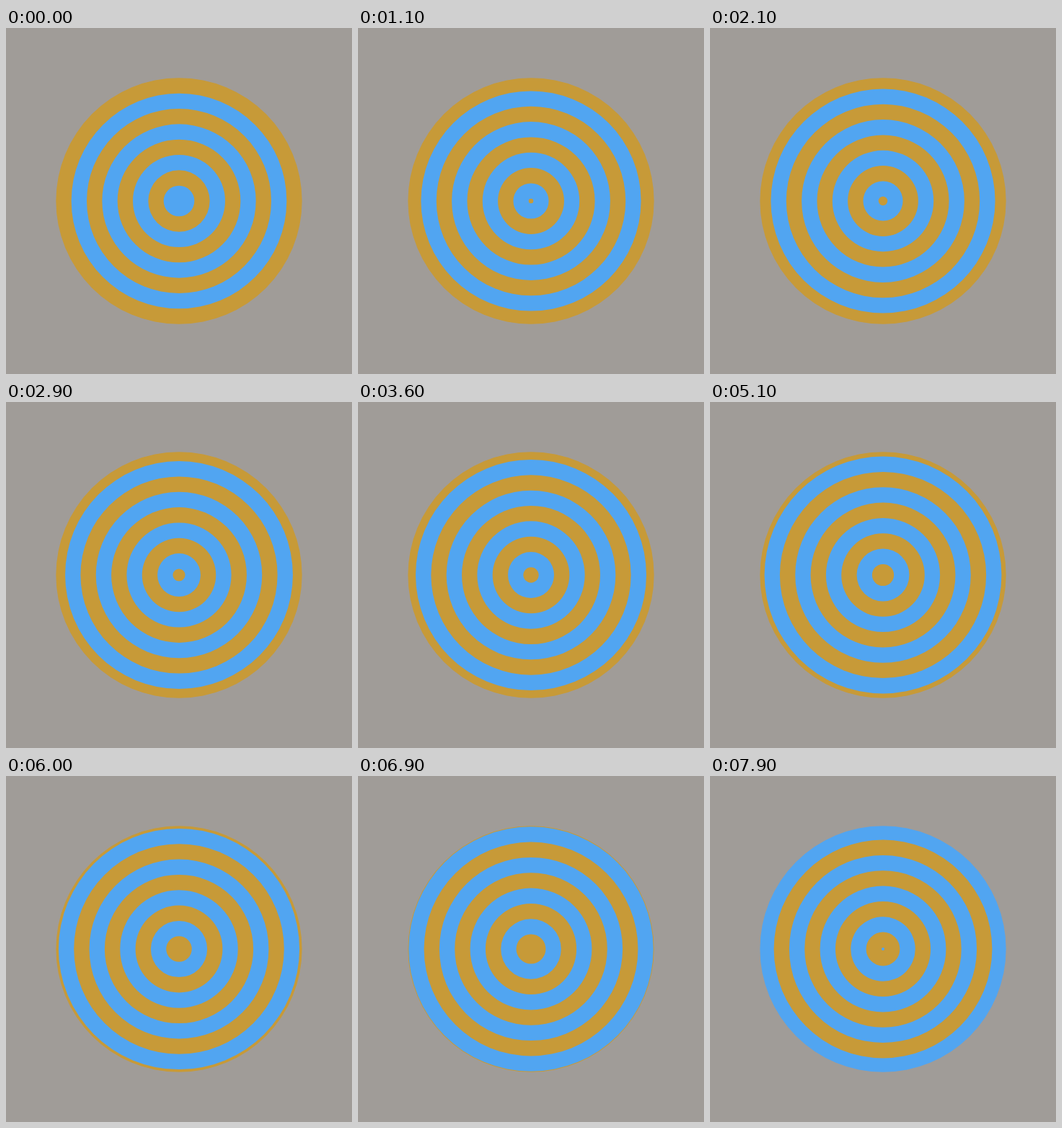
An HTML page with a canvas that plays this animation: 480x480 px, repeating every 8000 ms.

```html
<!DOCTYPE html>
<html lang="en">
<head>
<meta charset="utf-8">
<title>Expanding rings</title>
<style>
  html, body { margin: 0; width: 100%; height: 100%; overflow: hidden; background: #a09c98; }
  canvas { display: block; width: 480px; height: 480px; }
</style>
</head>
<body>
<canvas id="stage" width="480" height="480"></canvas>
<script>
const ctx = document.getElementById('stage').getContext('2d');
const LOOP = 8000, STEP = 100;
const STEPS_PER_RING = 72;   // steps for a ring to grow by one ring width
const RADIUS = 512 / 3;
const RINGS = 8;
const WIDTH = RADIUS / RINGS;
const GOLD = '#c79a38', BLUE = '#51a5f1', GREY = '#a09c98';

function disc(radius, color) {
  ctx.fillStyle = color;
  ctx.beginPath();
  ctx.arc(240, 240, radius, 0, Math.PI * 2);
  ctx.fill();
}

function draw(step) {
  const shift = step / STEPS_PER_RING;
  ctx.fillStyle = GREY;
  ctx.fillRect(0, 0, 480, 480);
  // Paint from the rim inwards; the rim itself never grows.
  const outer = RINGS - Math.floor(shift);
  for (let i = outer; i + shift > 0; i--) {
    const radius = Math.min(RADIUS, (i + shift) * WIDTH);
    disc(radius, i % 2 ? BLUE : GOLD);
  }
}

const start = performance.now();
function tick() {
  const time = (performance.now() - start) % LOOP;
  draw(Math.floor(time / STEP));
  requestAnimationFrame(tick);
}
tick();
</script>
</body>
</html>
```
